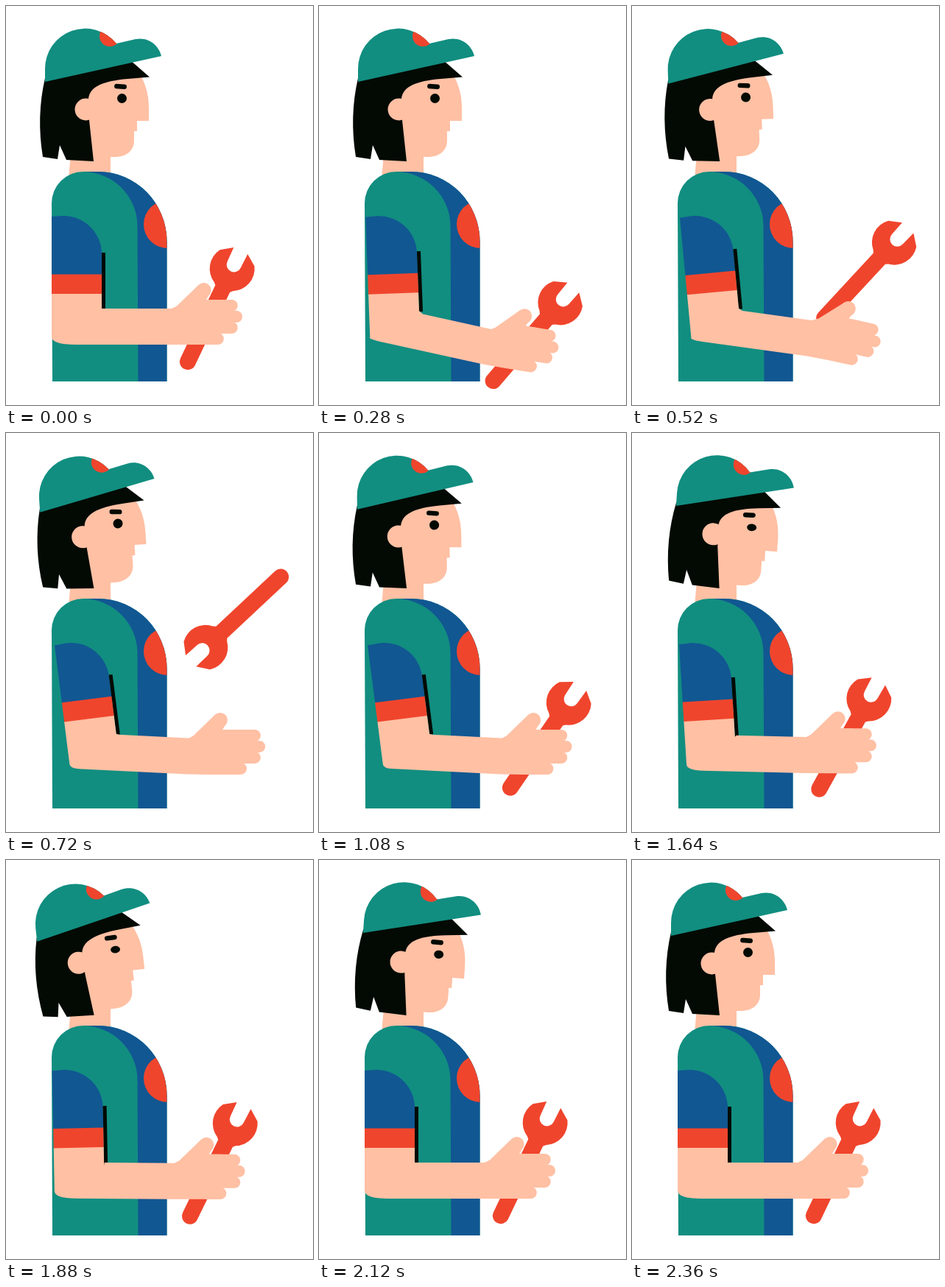
An HTML page with a canvas for the animation above (2400 ms loop, 417x542 px).

```html
<!DOCTYPE html>
<html lang="en">
<head>
<meta charset="utf-8">
<title>Mechanic tossing a wrench</title>
<style>
html, body { margin: 0; width: 100%; height: 100%; overflow: hidden; background: #fff; }
canvas { display: block; }
</style>
</head>
<body>
<canvas id="stage" width="417" height="542"></canvas>
<script>
const ctx = document.getElementById('stage').getContext('2d');
const LOOP = 2400, STEP = 40, RAD = Math.PI / 180;
const GREEN = '#118e80', BLUE = '#115792', RED = '#f0452d', SKIN = '#ffc0a4', INK = '#030a03';

const mix = (a, b, k) => a + (b - a) * k;
const clamp = x => Math.max(0, Math.min(1, x));

// 0 to 1 between two times, slow at both ends.
function ease(t, from, to) {
  const x = clamp((t - from) / (to - from));
  return x * x * (3 - 2 * x);
}
// Rises, holds at 1, then falls back to 0.
const hold = (t, up, top, down, end) => ease(t, up, top) - ease(t, down, end);
// Single cosine hump around a peak time.
const bump = (t, peak, width) => (1 + Math.cos(Math.PI * clamp(Math.abs(t - peak) / width))) / 2;

function headTurn(t) {
  const lookUp = -3.9 * bump(t, 740, 463);
  const nod = 5.05 * Math.cos(2 * Math.PI * (t - 1640) / 480) - 1.25;
  return lookUp + nod * hold(t, 1160, 1400, 2120, 2360);
}
const squint = t => 0.25 * hold(t, 1080, 1400, 1900, 2360);
const upperTurn = t => -7.3 * hold(t, 0, 780, 1130, 2130);
const foreTurn = t => -0.39 * upperTurn(t) + 12.5 * bump(t, 340, 340);
const handTurn = t => 16 * bump(t, 420, 300) + 5 * bump(t, 1180, 100);
const fingerReach = t => 9 * hold(t, 520, 700, 920, 1010);
const gripTurn = t => -64.5 + 9 * hold(t, 0, 440, 1130, 2000);

const airborne = t => hold(t, 440, 510, 950, 1000);
const flight = t => ({
  x: 322 - 26 * ((t - 720) / 280) ** 2,
  y: 242 + 0.002625 * (t - 743) ** 2,
  turn: -40 - 372 * ease(t, 480, 965)
});

// Maps rest coordinates to the stage, turned about a pivot that has moved to "at".
function joint(pivot, at, deg) {
  const c = Math.cos(deg * RAD), s = Math.sin(deg * RAD);
  return (x, y) => {
    const dx = x - pivot[0], dy = y - pivot[1];
    return [at[0] + dx * c - dy * s, at[1] + dx * s + dy * c];
  };
}

function paint(color, draw) {
  ctx.fillStyle = color;
  ctx.beginPath();
  draw(ctx);
  ctx.fill();
}
const disc = (color, x, y, r, ry = r) => paint(color, c => c.ellipse(x, y, r, ry, 0, 0, 7));

function fillPath(color, path) {
  ctx.fillStyle = color;
  ctx.fill(path);
}

function bar(color, width, from, to) {
  ctx.strokeStyle = color;
  ctx.lineWidth = width;
  ctx.lineCap = 'round';
  ctx.beginPath();
  ctx.moveTo(...from);
  ctx.lineTo(...to);
  ctx.stroke();
}

function clipped(path, draw) {
  ctx.save();
  ctx.clip(path);
  draw();
  ctx.restore();
}

function turned(x, y, deg, draw) {
  ctx.save();
  ctx.translate(x, y);
  ctx.rotate(deg * RAD);
  ctx.translate(-x, -y);
  draw();
  ctx.restore();
}

const neck = new Path2D('M89 190H142V235H85Z');
const face = new Path2D('M110 100L174 82C188 98 194 118 194 138V156H178V170H174V183C174 196 164 205 148 205H118L105 140Z');
const hair = new Path2D('M53 98Q41 150 50 205L70 208L73 189L82 209L119 211L113 155L112 126C114 109 132 102 165 99L195 96.5L168 73Z');
const cap = new Path2D('M53 103V85.5A54.5 54.5 0 0 1 150 51L176 45C194 41.5 208 54 211 68Z');
const shirt = new Path2D('M62 268A43 43 0 0 1 105 225H125A93.5 95 0 0 1 218.5 320V510H63Z');
const shirtSide = new Path2D('M104 225A74.5 74 0 0 1 178.5 299L179.5 510H220V220H104Z');
const sleeve = new Path2D('M62 286L78 285A52 52 0 0 1 130 337V366H62Z');
const wrench = new Path2D('M97 -10.5L76 -10A10 10 0 0 0 76 10L97 10.5L86 26A30.5 30.5 0 0 1 43 14L40 11H-70A11 11 0 0 1 -70 -11H40L43 -14A30.5 30.5 0 0 1 86 -26Z');

function drawHead(t) {
  const narrow = squint(t), slide = -10 * narrow;
  fillPath(SKIN, neck);
  turned(118, 205, headTurn(t), () => {
    fillPath(SKIN, face);
    fillPath(INK, hair);
    disc(SKIN, 108.5 + slide, 140.5 + slide, 15);
    fillPath(GREEN, cap);
    clipped(cap, () => disc(RED, 141, 41, 14));
    disc(INK, 157.5, 125.5, 6.5, 6.5 * (1 - narrow));
    bar(INK, 6.4, [150.3 + slide, 109], [160.8 + slide, 109.8 - 4 * narrow]);
  });
}

function drawShirt() {
  fillPath(GREEN, shirt);
  clipped(shirt, () => {
    fillPath(BLUE, shirtSide);
    disc(RED, 219.5, 296.5, 32.5);
  });
}

function drawWrench(t, hand) {
  const air = airborne(t), fly = flight(t);
  const [heldX, heldY] = hand(277, 420);
  const heldTurn = gripTurn(t) + handTurn(t) - (t > 720 ? 360 : 0);
  ctx.save();
  ctx.translate(mix(heldX, fly.x, air), mix(heldY, fly.y, air));
  ctx.rotate(mix(heldTurn, fly.turn, air) * RAD);
  fillPath(RED, wrench);
  ctx.restore();
}

function drawArm(t, upper, fore, hand) {
  const bend = upperTurn(t);
  turned(83, 255, bend, () => {
    fillPath(BLUE, sleeve);
    ctx.fillStyle = INK;
    ctx.fillRect(130, 335, 5, 82);
    ctx.fillStyle = RED;
    ctx.fillRect(62, 364.5, 68, 27.5);
  });

  paint(SKIN, c => {
    c.moveTo(...upper(62, 391));
    c.lineTo(...upper(62, 449));
    c.quadraticCurveTo(...fore(62 - bend / 2, 460), ...fore(95 + 2.4 * bend, 460));
    const outline = [
      fore(225, 460), hand(255, 460), hand(289, 460), hand(289, 399), hand(272, 399), hand(276, 392),
      hand(262, 378.5), hand(232, 407.5), fore(225, 411), fore(130, 411), upper(130, 416), upper(130, 391)
    ];
    outline.forEach(p => c.lineTo(...p));
  });

  disc(SKIN, ...hand(268.7, 386), 10);
  for (let i = 0; i < 4; i++) {
    const y = 407 + 15 * i, tip = 313 - 6.3 * (i - 1) ** 2;
    bar(SKIN, 16, hand(270, y), hand(tip + fingerReach(t), y));
  }
}

function render(t) {
  const upper = joint([83, 255], [83, 255], upperTurn(t));
  const fore = joint([95, 435], upper(95, 435), foreTurn(t));
  const hand = joint([235, 436], fore(235, 436), handTurn(t));
  ctx.fillStyle = '#fff';
  ctx.fillRect(0, 0, 417, 542);
  drawHead(t);
  drawShirt();
  drawWrench(t, hand);
  drawArm(t, upper, fore, hand);
}

const start = performance.now();
function tick() {
  const t = (performance.now() - start) % LOOP;
  render(Math.floor(t / STEP) * STEP);
  requestAnimationFrame(tick);
}
tick();
</script>
</body>
</html>
```
